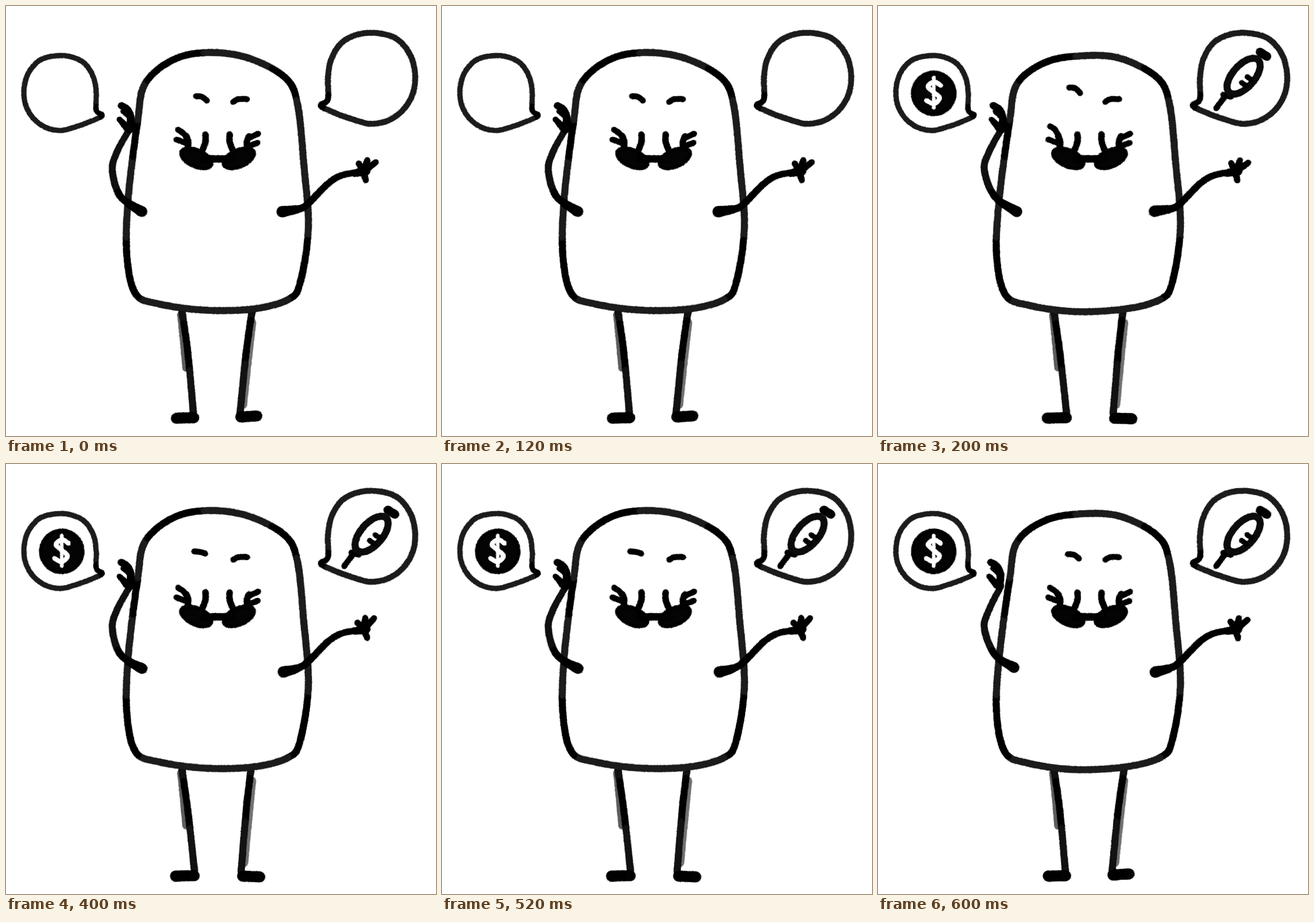
Recreate the animation shown at these times as an HTML page with a canvas. Size 748 px wide and 748 px high, loop 0.8 s.

```html
<!DOCTYPE html>
<html lang="en">
<head>
<meta charset="utf-8">
<title>Chatty character</title>
<style>
html, body { margin: 0; width: 100%; height: 100%; overflow: hidden; background: #fff; }
canvas { display: block; width: 100vw; height: 100vh; }
</style>
</head>
<body>
<canvas id="stage" width="748" height="748"></canvas>
<script>
const SIZE = 748, STEP = 200, AXIS = 368;
const GREY = 30, BLACK = 4, WHITE = 255;
let g, seed = 1;

function rnd() {
  seed = (seed * 16807) % 2147483647;
  return seed / 2147483647;
}

const clamp = v => Math.max(0, Math.min(1, v));
const mirror = p => p.map((v, i) => i % 2 ? v : 2 * AXIS - v);

function spline(a, b, c, d, t) {
  return 0.5 * (2 * b + (c - a) * t + (2 * a - 5 * b + 4 * c - d) * t * t + (3 * b - a - 3 * c + d) * t * t * t);
}

// Dense samples [x, y, u] along a smooth curve; u counts in control points.
function trace(p, closed) {
  const n = p.length / 2, out = [];
  const at = (i, k) => p[2 * (closed ? (i + n) % n : Math.max(0, Math.min(n - 1, i))) + k];
  for (let i = 0; i < (closed ? n : n - 1); i++) {
    const len = Math.hypot(at(i + 1, 0) - at(i, 0), at(i + 1, 1) - at(i, 1));
    const m = Math.max(2, Math.ceil(len));
    for (let j = 0; j < m; j++) {
      const q = k => spline(at(i - 1, k), at(i, k), at(i + 1, k), at(i + 2, k), j / m);
      out.push([q(0), q(1), i + j / m]);
    }
  }
  if (!closed) out.push([at(n - 1, 0), at(n - 1, 1), n - 1]);
  return out;
}

function dot(x, y, r) {
  g.beginPath();
  g.arc(x, y, r, 0, 7);
  g.fill();
}

// Charcoal line: jittered stamps with a faint halo and loose grains on the rim.
function ink(p, w, { end = w, closed = false, tone = BLACK, dark = [] } = {}) {
  const path = trace(p, closed), last = path.length - 1;
  path.forEach(([x, y, u], i) => {
    const r = (w + (end - w) * i / last) / 2;
    const v = dark.some(([a, b]) => u >= a && u <= b) ? BLACK : tone;
    g.fillStyle = `rgb(${v},${v},${v})`;
    g.globalAlpha = 0.06;
    dot(x, y, r + 1.3);
    g.globalAlpha = 0.7;
    dot(x + rnd() - 0.5, y + rnd() - 0.5, r - 0.2 + rnd() * 0.6);
    g.globalAlpha = 0.35;
    for (let k = 0; k < 2; k++) {
      const a = rnd() * 6.283, d = r + rnd();
      dot(x + Math.cos(a) * d, y + Math.sin(a) * d, 0.9);
    }
  });
  g.globalAlpha = 1;
}

function ring(cx, cy, rx, ry, turn = 0) {
  const p = [], c = Math.cos(turn), s = Math.sin(turn);
  for (let a = 0; a < 6.28; a += Math.PI / 8) {
    const x = rx * Math.cos(a), y = ry * Math.sin(a);
    p.push(cx + x * c - y * s, cy + x * s + y * c);
  }
  return p;
}

function blob(p) {
  g.fillStyle = `rgb(${BLACK},${BLACK},${BLACK})`;
  g.beginPath();
  trace(p, true).forEach(([x, y]) => g.lineTo(x, y));
  g.fill();
  ink(p, 4, { closed: true });
}

// Oval with slightly square shoulders and a tail low on one side.
function drawBubble(cx, cy, rx, ry, side, w) {
  const p = [], put = (x, y) => p.push(cx + side * rx * x, cy + ry * y);
  for (let i = 0; i <= 12; i++) {
    const a = 1.12 + i * 0.43;
    const bulge = 1 + 0.06 * Math.max(0, -Math.sin(a)) * Math.sin(2 * a) ** 2;
    put(bulge * Math.cos(a), bulge * Math.sin(a));
  }
  put(1, 0.46);
  put(1.16, 0.6);
  put(0.84, 0.76);
  ink(p, w, { closed: true, tone: GREY, dark: [[12.7, 14.5]] });
}

const torso = [350,81, 420,90, 485,124, 507,170, 518,275, 526,385, 512,480, 492,510, 430,527,
  345,529, 265,518, 225,500, 210,430, 213,330, 229,200, 242,135, 290,94];

// Leaning drops the crown and widens the lower left.
function drawBody(lean) {
  const p = [];
  for (let i = 0; i < torso.length; i += 2) {
    const x = torso[i], y = torso[i + 1], left = lean * clamp((430 - x) / 80);
    p.push(x - 4 * left * clamp((y - 300) / 80), y + left * (6 * clamp((140 - y) / 60) + 2.5 * clamp((y - 480) / 40)));
  }
  ink(p, 11, {
    closed: true, tone: GREY,
    dark: [[1.6, 2.9], [5.2, 7], [10.8, 12.3], [13.5, 14], [15.1, 16.9]]
  });
}

function drawCoin() {
  blob(ring(97, 152, 37, 37));
  ink([109,138, 98,132, 87,140, 97,150, 107,160, 97,170, 84,164], 7, { tone: WHITE });
  ink([97,124, 97,178], 5, { tone: WHITE });
}

function drawSyringe() {
  ink([588,178, 603,158], 9);
  ink([600,154, 614,158], 9);
  ink(ring(636, 122, 38, 19, -0.85), 11, { closed: true, tone: 14 });
  for (const d of [0, 10]) ink([632 + d, 133 - d, 641 + d, 139 - d], 8);
  ink([664,80, 677,88], 14);
}

function drawFace(browX, browY, drop, lashY) {
  ink([browX, browY, browX + 11, browY + 1, browX + 20, browY + 6 + drop], 9);
  ink([395,167, 404,162, 420,162], 9);
  const lens = ring(331, 265, 29, 15, 0.42);
  blob(lens);
  blob(mirror(lens));
  ink([345,266, 391,266], 12);
  for (const p of [[347,223, 347,236, 342,250], [313,226, 317,236, 316,248]]) {
    ink(p, 10);
    ink(mirror(p), 10);
  }
  ink([299,lashY, 308,lashY + 6, 315,228], 9);
  ink([296,232, 312,238], 9);
  ink([439,222, 422,230], 9);
  ink([438,238, 424,243], 9);
}

function drawLeftArm(lean, dx, dy, endX, endY) {
  const bend = 4 * lean, hand = p => p.map((v, i) => v + (i % 2 ? dy : dx));
  ink([216 + dx / 2,212, 193,254, 185,286, 199 + bend,331, endX, endY], 10, { end: 12, tone: 20, dark: [[2.8, 4]] });
  ink([212 + bend,343, endX, endY], 12, { end: 18 });
  ink(hand([200,172, 211,179, 217,194, 215,214]), 11, { end: 13 });
  ink(hand([203,182, 214,192]), 7);
  ink(hand([197,196, 211,211]), 8, { end: 13 });
}

function drawRightArm(x, y, tilt) {
  const neckY = (y + 350) / 2;
  ink([x, y, 505,neckY, 523,346, 560,309, 583,295, 606,290], 12, { end: 10 });
  ink([x, y, 506,neckY], 19, { end: 13 });
  ink([606,291, 626,287], 11, { end: 16 });
  for (const [angle, len] of [[-2.2, 18], [-1.34, 21], [-0.7, 26], [1.45, 16]]) {
    const a = angle + tilt;
    ink([622,288, 624 + len * Math.cos(a), 288 + len * Math.sin(a)], 12, { end: 9 });
  }
}

function drawLegs(step) {
  ink([304,536, 313,630], 11, { tone: 95 });
  ink([429,550, 413 + 2 * step,695], 11, { tone: 115 });
  ink([306,531, 316,600, 326 + 2 * step,708], 11, { tone: 22, dark: [[0.4, 1.3]] });
  ink([428 - 2 * step,532, 418,600, 407 + 2 * step,710], 11, { tone: 22, dark: [[0.3, 1.2]] });
  ink([296 - 2 * step,717, 327 + step,716], 18);
  ink([408 + 3 * step,715 + 2 * step, 437 + 5 * step,713 + 5 * step], 18);
}

// lean and step toggle the body and feet; the rest are small offsets of each part.
const poses = [
  { lean: 0, step: 0, icons: false, face: [330, 157, 2, 215], left: [0, 1, 237, 358], right: [480, 358, 0] },
  { lean: 1, step: 1, icons: true, face: [332, 142, 4, 209], left: [0, 1, 242, 358], right: [480, 357, 0.05] },
  { lean: 0, step: 1, icons: true, face: [327, 152, -2, 215], left: [0, -1, 237, 356], right: [482, 362, -0.18] },
  { lean: 1, step: 0, icons: true, face: [330, 157, 2, 215], left: [-4, -1, 237, 354], right: [482, 362, -0.03] }
];

const sheets = poses.map((p, i) => {
  const c = document.createElement('canvas');
  c.width = c.height = SIZE;
  g = c.getContext('2d');
  g.fillStyle = '#fff';
  g.fillRect(0, 0, SIZE, SIZE);
  seed = 4211 + i * 977;
  drawBubble(94, 151.5, 63, 65, 1, 8);
  drawBubble(636, 126, 76, 79, -1, 9);
  drawLegs(p.step);
  drawBody(p.lean);
  drawFace(...p.face);
  drawLeftArm(p.lean, ...p.left);
  drawRightArm(...p.right);
  if (p.icons) {
    drawCoin();
    drawSyringe();
  }
  return c;
});

const view = document.getElementById('stage').getContext('2d');
function play() {
  view.drawImage(sheets[Math.floor(performance.now() / STEP) % sheets.length], 0, 0);
  requestAnimationFrame(play);
}
play();
</script>
</body>
</html>
```
